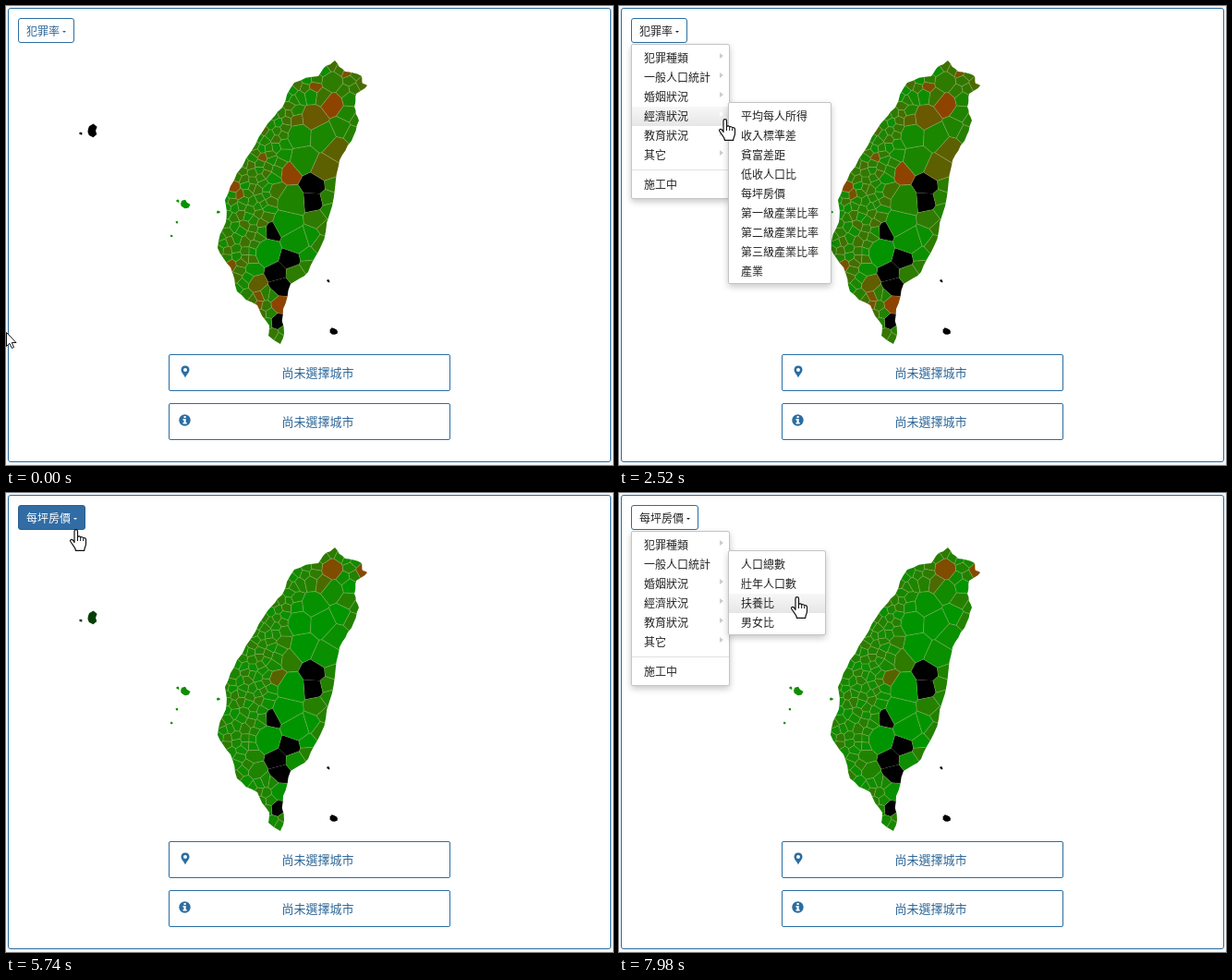
Recreate the animation shown at these times as an HTML page with a canvas. Size 657 px wide and 497 px high, loop 8 s.

```html
<!DOCTYPE html>
<html lang="zh-Hant">
<head>
<meta charset="utf-8">
<title>Map menu</title>
<style>
:root { --blue: #2b6da0; }
html, body { margin: 0; width: 100%; height: 100%; overflow: hidden; background: #f3f5f7; }
body { position: relative; font: 12px/21px "Noto Sans CJK TC", "Noto Sans CJK", sans-serif; color: #222; }
body * { box-sizing: border-box; }
.card, .btn, .panel, .menu, .row, canvas, #cursor, svg { position: absolute; }
.card { left: 2px; top: 2px; width: 653px; height: 492px; background: #fff; border: 1px solid var(--blue); border-radius: 3px; }
canvas { left: 0; top: 0; }
.btn { left: 13px; top: 13px; height: 27px; padding: 0 8px; line-height: 25px; white-space: nowrap;
  background: #fff; border: 1px solid var(--blue); border-radius: 3px; color: #2a6496; }
.btn i { display: inline-block; margin-left: 3px; vertical-align: 3px; border: 2.5px solid transparent; border-top-color: currentColor; border-bottom: 0; }
.btn.open { color: #222; }
.btn.hover { background: #316ca4; border-color: #2a5f92; color: #fff; }
.panel { left: 176px; width: 305px; height: 40px; padding-left: 18px; border: 1px solid var(--blue); border-radius: 2px;
  font-size: 13px; line-height: 38px; text-align: center; color: #2a6496; }
.panel svg { left: 10px; top: 11px; fill: var(--blue); }
.menu { background: #fff; border: 1px solid #c4c4c4; border-radius: 2px; box-shadow: 0 3px 7px rgba(0,0,0,.22); }
.row { left: 0; right: 0; height: 21px; padding-left: 13px; line-height: 19px; white-space: nowrap; }
.row.on { background: linear-gradient(#f7f7f7, #e6e6e6); }
.more::after { content: ""; position: absolute; right: 6px; top: 5px; border: 3.5px solid transparent; border-left: 4px solid #ccc; border-right: 0; }
.more.lit::after { border-left-color: #fff; }
.line { position: absolute; left: 0; right: 0; top: 135px; height: 1px; background: #e2e2e2; }
#cursor { left: 0; top: 0; width: 24px; height: 26px; }
#cursor svg { left: 0; top: 0; overflow: visible; fill: #fff; stroke: #111; stroke-linejoin: round; }
</style>
</head>
<body>
<div class="card"></div>
<canvas id="crime" width="657" height="497"></canvas>
<canvas id="price" width="657" height="497"></canvas>
<div class="panel" style="top:377px">
  <svg width="14" height="14"><path fill-rule="evenodd" d="M7 .5C4 .5 2.500 2.600 2.500 5c0 3 3 5 4.500 8.500C8.500 10 11.500 8 11.500 5 11.500 2.600 10 .5 7 .5ZM7 3a2 2 0 1 1 0 4 2 2 0 0 1 0-4Z"/></svg>
  尚未選擇城市</div>
<div class="panel" style="top:430px">
  <svg width="14" height="14"><circle cx="6.500" cy="6.500" r="6.200"/><path fill="#fff" d="M5.500 2h2.200v2H5.500ZM4.500 5h3.200v4h1v1.500H4.500V9h1V6.500h-1Z"/></svg>
  尚未選擇城市</div>
<div class="btn" id="btn"><span></span><i></i></div>
<div id="menus"></div>
<div id="cursor">
  <svg id="arrow" width="12" height="19"><path d="M.5.5V15.500L4 12.300 6.300 17.500 8.500 16.600 6.300 11.500H11Z"/></svg>
  <svg id="hand" width="19" height="24"><path stroke-width="1.200" d="M5 14.500V2.400a1.700 1.700 0 0 1 3.500 0V8.600c.6-1 3-.9 3.200.6.700-.9 2.900-.6 3 .8.800-.7 2.800-.3 2.800 1.500V16c0 3-1.800 4-1.800 7.400H6.500C6.500 20 3.500 18 .8 13.500c-.9-1.900 1.400-3 2.800-1.200Z"/><path fill="none" d="M8.500 9v4M11.700 9.500v3.500M14.700 10.500V13"/></svg>
</div>
<script>
const $ = id => document.getElementById(id);
function random(seed) {
  return () => (seed = (seed * 16807) % 2147483647) / 2147483647;
}

// ---------- map ----------
const coast = `356,59 367,71 385,76 386,84 391,86 379,95 377,109 382,124 374,146 361,167 357,188 350,226
 341,260 327,288 308,301 300,328 301,354 297,366 284,357 285,346 272,324 250,309 243,283 229,262
 238,234 237,210 250,181 270,150 289,121 299,110 312,83 338,76 345,66`;
// x, y, radius
const noData = [[335, 194, 9], [334, 210, 7], [287, 243, 5], [308, 274, 8], [293, 289, 7], [297, 304, 8], [294, 342, 6]];
// x, y, radius, share in the first map, share in the second
const districts = [
  [358, 156, 10, .62, .07], [346, 176, 12, .62, .07], [354, 105, 8, .95, .12], [332, 122, 10, .7, .04],
  [315, 124, 5, .6, .04], [306, 179, 5, .95, .3], [246, 196, 5, .9, .2], [271, 301, 6, .65, .2],
  [296, 323, 7, .95, .05], [353, 82, 9, .3, .85], [387, 85, 6, .5, .88], [291, 201, 5, .4, .6],
  [344, 97, 5, .4, .5], [334, 87, 4, .85, .3], [314, 290, 8, .3, .1]
];
const isles = [
  [93, 135, 7, -1, -2], [81, 138, 2, -1, -2], [193, 215, 6, .05, .1], [186, 211, 2, .05, .1], [185, 234, 1.5, .05, .1],
  [179, 249, 1.5, .05, .1], [230, 223, 2, .1, .1], [349, 298, 2, -1, -1], [355, 352, 4, -1, -1]
];

const rnd = random(4127);
function shape(pts) {
  const p = new Path2D();
  pts.forEach(q => p.lineTo(...q));
  p.closePath();
  return p;
}
// splits every edge and pushes its middle a little sideways
function roughen(pts) {
  return pts.flatMap((p, i) => {
    const q = pts[(i + 1) % pts.length], k = (rnd() - .5) * .16;
    return [p, [(p[0] + q[0]) / 2 + (q[1] - p[1]) * k, (p[1] + q[1]) / 2 - (q[0] - p[0]) * k]];
  });
}
function blob(x, y, r) {
  return shape(Array.from({ length: 9 }, (_, i) => {
    const a = i * Math.PI * 2 / 9, d = r * (.5 + .6 * rnd());
    return [x + d * 1.1 * Math.cos(a), y + d * Math.sin(a)];
  }));
}
// a share below zero stands for missing data
function shade(v) {
  if (v === -1) return '#000';
  if (v === -2) return '#063f06';
  return `rgb(${150 * v | 0},${150 - 86 * v | 0},0)`;
}

// the mountains follow a slanted ridge, where districts are large
const ridge = (x, y) => x - 345 + .28 * (y - 110);
const isHigh = (x, y) => Math.abs(ridge(x, y)) < 27 && y > 96 && y < 312;
function spacing(x, y) {
  if (y < 96 || y > 312) return 7;
  const d = ridge(x, y);
  if (d > 24) return 11;
  return 23 - 16.5 * Math.min(1, Math.max(0, (-d - 21) / 10));
}
function shares(x, y) {
  const a = rnd(), b = rnd(), east = ridge(x, y) > 0;
  if (isHigh(x, y)) return [y > 225 ? .02 + .06 * a : .13 + .1 * a, .02 * b];
  return [
    a > .96 ? .8 : east ? .2 + .22 * a : .06 + .44 * a,
    y < 110 ? .1 + .26 * b : east ? .12 + .14 * b : .05 + .27 * b
  ];
}

const land = shape(roughen(roughen(coast.trim().split(/\s+/).map(p => p.split(',').map(Number)))));
const probe = $('crime').getContext('2d');
const sites = [...noData.map(([x, y, r]) => ({ x, y, r, v: [-1, -1] })),
  ...districts.map(([x, y, r, ...v]) => ({ x, y, r, v }))];
for (let i = 0; i < 16000; i++) {
  const x = 228 + rnd() * 164, y = 58 + rnd() * 308;
  if (!probe.isPointInPath(land, x, y)) continue;
  const r = spacing(x, y) / 2;
  if (sites.every(s => Math.hypot(s.x - x, s.y - y) > r + s.r)) sites.push({ x, y, r, v: shares(x, y) });
}
// the part of a square that lies nearer to s than to any other site, weighed by radius
function cell(s) {
  let poly = [[-1, -1], [1, -1], [1, 1], [-1, 1]].map(([i, j]) => [s.x + 40 * i, s.y + 40 * j]);
  for (const o of sites) {
    const dx = o.x - s.x, dy = o.y - s.y;
    if (o === s || Math.hypot(dx, dy) > 90) continue;
    const limit = (dx * dx + dy * dy + s.r * s.r - o.r * o.r) / 2;
    const side = p => (p[0] - s.x) * dx + (p[1] - s.y) * dy - limit;
    poly = poly.flatMap((p, i) => {
      const q = poly[(i + 1) % poly.length], u = side(p), v = side(q), out = u <= 0 ? [p] : [];
      if (u * v < 0) out.push([p[0] + (q[0] - p[0]) * u / (u - v), p[1] + (q[1] - p[1]) * u / (u - v)]);
      return out;
    });
  }
  return shape(poly);
}
sites.forEach(s => s.path = cell(s));
const blobs = isles.map(([x, y, r, ...v]) => ({ path: blob(x, y, r), v }));

function drawMap(id, k) {
  const c = $(id).getContext('2d');
  const paint = s => {
    c.fillStyle = shade(s.v[k]);
    c.fill(s.path);
  };
  c.lineWidth = .6;
  c.strokeStyle = 'rgba(140,170,90,.5)';
  blobs.forEach(paint);
  c.clip(land);
  sites.forEach(paint);
  sites.forEach(s => s.v[k] >= 0 && c.stroke(s.path));
}
drawMap('crime', 0);
drawMap('price', 1);

// ---------- menus ----------
const ROW = 21, PAD = 5;
function makeMenu(x, top, w, names) {
  const el = document.createElement('div');
  el.className = 'menu';
  el.style.cssText = `left:${x}px;top:${top}px;width:${w}px;height:${names.length * ROW + 8}px`;
  const rows = names.map((name, i) => {
    const row = document.createElement('div');
    row.className = 'row';
    row.style.top = PAD - 1 + i * ROW + 'px';
    row.textContent = name;
    return el.appendChild(row);
  });
  $('menus').append(el);
  return { el, rows, x, w, y: top + PAD };
}
const main = makeMenu(13, 41, 107, ['犯罪種類', '一般人口統計', '婚姻狀況', '經濟狀況', '教育狀況', '其它']);
main.rows.forEach(r => r.classList.add('more'));
main.el.style.height = '168px';
main.el.insertAdjacentHTML('beforeend', '<div class="line"></div><div class="row" style="top:141px">施工中</div>');
const makeSub = (i, w, names) => makeMenu(118, main.y + i * ROW - PAD, w, names);
const subs = {
  0: makeSub(0, 106, ['犯罪率', '竊盜', '暴力犯罪', '詐欺', '毒品', '賭博', '公共危險', '其它']),
  1: makeSub(1, 106, ['人口總數', '壯年人口數', '扶養比', '男女比']),
  3: makeSub(3, 112, ['平均每人所得', '收入標準差', '貧富差距', '低收人口比', '每坪房價',
    '第一級產業比率', '第二級產業比率', '第三級產業比率', '產業'])
};
function rowAt(m, x, y) {
  if (!m || x < m.x || x >= m.x + m.w) return -1;
  const i = Math.floor((y - m.y) / ROW);
  return i < m.rows.length ? i : -1;
}

// ---------- timeline ----------
const LOOP = 8000, TICK = 70;
const OPEN = 980, CLICK = 3500, CLOSE = 3710, RECOLOR = 3780, REOPEN = 6090;
// time, x, y of the pointer
const path = [
  [0, 0, 353], [700, 60, 29], [1470, 60, 29], [1680, 64, 73], [1890, 98, 84], [2030, 108, 119], [2170, 108, 119],
  [2520, 115, 122], [3010, 179, 181], [3220, 190, 204], [4970, 190, 204], [5740, 76, 39], [5950, 75, 34],
  [6580, 75, 34], [7140, 106, 77], [7490, 106, 77], [7980, 193, 112]
];
function pointer(t) {
  const i = Math.max(1, path.findIndex(p => p[0] >= t));
  const [t0, x0, y0] = path[i - 1], [t1, x1, y1] = path[i];
  const u = Math.min(1, (t - t0) / (t1 - t0)), e = u * u * (3 - 2 * u);
  return [x0 + (x1 - x0) * e, y0 + (y1 - y0) * e].map(Math.round);
}
// the row whose submenu stays open depends on the way the pointer came
function openRow(t) {
  let row = -1;
  for (let s = t < CLOSE ? OPEN : REOPEN; s <= t; s += TICK) {
    const [x, y] = pointer(s);
    if (rowAt(subs[row], x, y) < 0) row = rowAt(main, x, y);
  }
  return row;
}
const show = (el, on) => el.style.visibility = on ? 'visible' : 'hidden';

function draw(t) {
  const [x, y] = pointer(t), open = t >= OPEN && t < CLOSE || t >= REOPEN;
  const row = open ? openRow(t) : -1, sub = subs[row], subRow = rowAt(sub, x, y);
  const btn = $('btn');

  show($('crime'), t < RECOLOR);
  show($('price'), t >= RECOLOR);
  btn.firstChild.textContent = t < CLOSE ? '犯罪率' : '每坪房價';
  const over = y > 12 && y < 41 && x > 12 && x < 13 + btn.offsetWidth;
  btn.classList.toggle('open', open && (t < CLICK || t >= REOPEN));
  btn.classList.toggle('hover', over);
  show(main.el, open);
  main.rows.forEach((r, i) => {
    r.classList.toggle('on', i === row && subRow < 0);
    r.classList.toggle('lit', i === row);
  });
  Object.values(subs).forEach(m => {
    show(m.el, m === sub);
    m.rows.forEach((r, i) => r.classList.toggle('on', m === sub && i === subRow));
  });
  const hand = over || open;
  show($('hand'), hand);
  show($('arrow'), !hand);
  $('cursor').style.transform = `translate(${x - (hand ? 7 : 0)}px,${y}px)`;
}

const start = performance.now();
let last = -1;
function frame() {
  const t = Math.floor((performance.now() - start) % LOOP / TICK) * TICK;
  if (t !== last) draw(last = t);
  requestAnimationFrame(frame);
}
draw(0);
requestAnimationFrame(frame);
</script>
</body>
</html>
```
